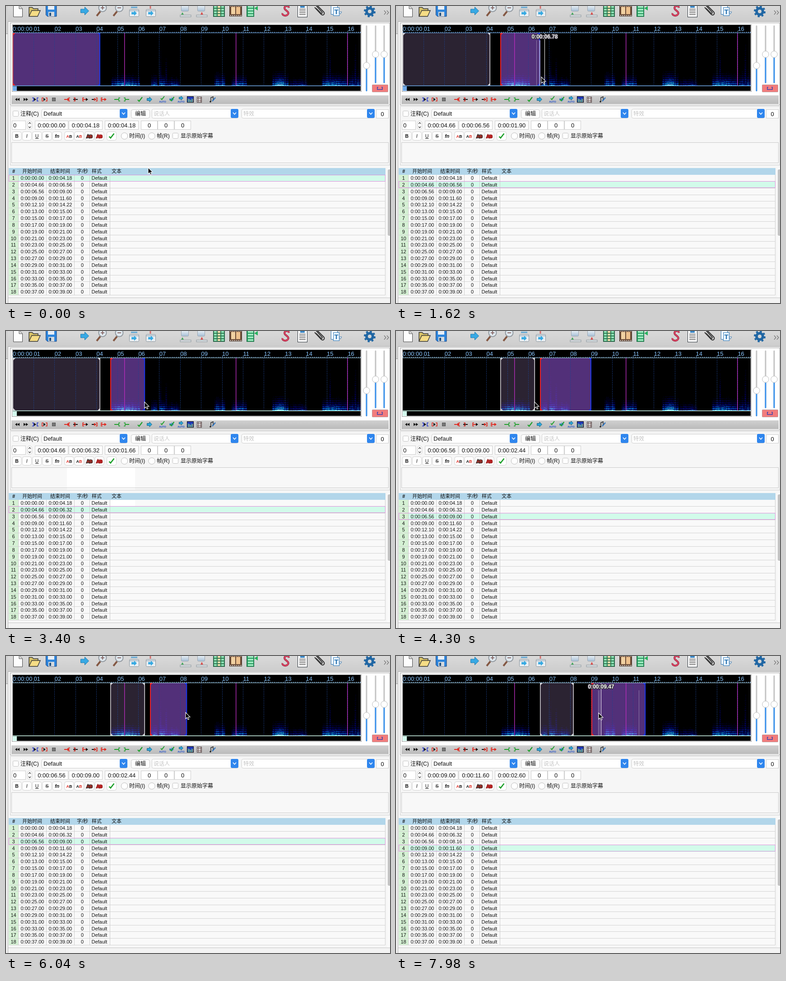
An HTML page with a canvas for the animation above (8000 ms loop, 851 by 658 pixels).

```html
<!DOCTYPE html>
<html lang="zh-CN">
<head>
<meta charset="utf-8">
<title>Subtitle timing</title>
<style>
html, body { margin: 0; width: 100%; height: 100%; overflow: hidden; background: #f6f6f6; }
svg, canvas { position: absolute; left: 0; top: 0; display: block; }
#wave { left: 15px; top: 59px; }
text { font-family: "Liberation Sans", "Noto Sans CJK SC", "Noto Sans CJK", sans-serif; white-space: pre; }
#label { font-weight: bold; font-size: 12px; fill: #fff; stroke: #3a3540; stroke-width: 3px; stroke-linejoin: round; paint-order: stroke; text-anchor: middle; }
</style>
</head>
<body>
<svg id="ui" width="851" height="658"></svg>
<canvas id="wave" width="771" height="119"></canvas>
<svg width="851" height="658">
  <text id="label" y="72"></text>
  <path id="mouse" d="M0 0V14L3.2 11.2L5.4 16L7.7 15L5.6 10.2H9.9Z" fill="#000" stroke="#fff" stroke-width="1.1"/>
</svg>
<script>
const $ = id => document.getElementById(id);
const BLACK = '#111', BLUE = '#2f86ee', RED = '#e02a20', GREEN = '#1fa02c', ROW = 14.84;
let out = [];
const rect = (x, y, w, h, fill, stroke = 'none', rx = 0, more = '') =>
  out.push(`<rect x="${x}" y="${y}" width="${w}" height="${h}" fill="${fill}" stroke="${stroke}" rx="${rx}" ${more}/>`);
const box = (x, y, w, h, fill, stroke, rx) => rect(x + .5, y + .5, w - 1, h - 1, fill, stroke, rx);
const path = (d, fill = 'none', stroke = 'none', w = 1) =>
  out.push(`<path d="${d}" fill="${fill}" stroke="${stroke}" stroke-width="${w}"/>`);
const text = (x, y, s, size = 12, fill = BLACK, more = '') =>
  out.push(`<text x="${x}" y="${y}" font-size="${size}" fill="${fill}" ${more}>${s}</text>`);
const mid = (x, y, s, size, fill, more = '') => text(x, y, s, size, fill, 'text-anchor="middle" ' + more);
const dot = (x, y, r, fill, stroke = 'none', w = 1) =>
  out.push(`<circle cx="${x}" cy="${y}" r="${r}" fill="${fill}" stroke="${stroke}" stroke-width="${w}"/>`);
const check = (x, y, s = 1, c = GREEN) =>
  path(`M${x - 5 * s} ${y + s}L${x - 2 * s} ${y + 4 * s}L${x + 5 * s} ${y - 5 * s}`, 'none', c, 2.4 * s);
const arrow = (x, y, s, c, line = 'none') =>
  path(`M${x - 9 * s} ${y - 4 * s}H${x}V${y - 9 * s}L${x + 9 * s} ${y}L${x} ${y + 9 * s}V${y + 4 * s}H${x - 9 * s}Z`, c, line);
const fmt = s => '0:00:' + s.toFixed(2).padStart(5, '0');
const toX = s => 15 + s * 46.4;

function topBar() {
  rect(0, 0, 851, 34, 'url(#bar)');
  rect(0, 34, 851, 1, '#a9a9a9');
  rect(0, 0, 4, 658, '#efefef'); rect(0, 0, 4, 62, '#d2d2d2');
  rect(0, 61, 4, 1, '#999'); rect(4, 34, 1, 624, '#b4b4b4');
  path('M16.5 -2V24H36.5V6L29 -2Z', '#fdfdfd', '#444'); path('M29 -1V6H36', '#ddd', '#555');
  path('M51 22V3H58L61 6H71V10', '#d9c36a', '#333', 1.4); path('M51 23L57 10H76L70 23Z', '#f5dc85', '#333', 1.4);
  path('M88.5 -2H112V23H92L88.5 20Z', '#2f86dc', '#173f7c'); rect(93, -2, 14, 10, '#e9eff6'); rect(94, 13, 13, 10, '#d5d9dd'); rect(96, 15, 4, 7, '#24527f');
  arrow(174.5, 11, 1, '#38a9e4', '#1c78ad');
  for (const x of [214, 251]) {
    path(`M${x - 5} 12L${x - 13} 22`, 'none', '#845843', 4);
    dot(x, 4, 8.5, '#dfe8ee', '#9299a0', 2);
    path(`M${x - 4} 4H${x + 4}` + (x < 220 ? `M${x} 0V8` : ''), 'none', '#8b6b6b', 2);
  }
  for (const x of [273, 310]) {
    box(x, 7, 22, 17, '#e8edf1', '#8c959c', 2); rect(x + 1, 9, 20, 3, '#bac6d0');
    path(x < 300 ? `M${x + 4} 3H${x + 18}` : `M${x + 10} -1V6`, 'none', x < 300 ? '#62a7d2' : '#d57070', 3);
    arrow(x + 11, 16, .65, '#35a9e2');
  }
  for (const x of [386, 422]) {
    box(x + 2, -3, 17, 15, 'url(#steel)', '#9ba5b0', 2);
    rect(x, 20, 24, 4, '#d9dee1', '#8d979d');
    path(x < 400 ? `M${x + 2} 19H${x + 8}L${x + 5} 14Z` : `M${x + 9} 19H${x + 15}L${x + 12} 13Z`, x < 400 ? '#42a85c' : '#d94a4a');
  }
  box(459, -2, 26, 26, '#2f7b53', '#285740');
  for (let r = 0; r < 4; r++) for (let c = 0; c < 3; c++)
    rect(461 + c * 8, r * 6, 6, 4, c == 1 ? '#f0d9a9' : '#8de0b5');
  box(495, -2, 28, 25, '#6b4a35', '#49382d');
  rect(499, 2, 9, 16, '#f0d0a1'); rect(510, 2, 9, 16, '#eec18d');
  for (let i = 0; i < 6; i++) { rect(497 + i * 4.5, -1, 2, 2, '#eee'); rect(497 + i * 4.5, 20, 2, 2, '#eee'); }
  box(533, -2, 17, 26, '#24975d', '#236d48');
  for (let r = 0; r < 4; r++) rect(536, r * 6, 12, 4, '#9ce7bd');
  path('M558 0V10L550 5Z', '#27b25c');
  const curl = 'M627 4C626 -3 614 0 618 7C621 11 628 13 625 18C621 24 611 21 613 16';
  path(curl, 'none', '#a21b38', 4); path(curl, 'none', '#ee5776', 1.5);
  box(646, -3, 22, 28, '#fff', '#30383f');
  rect(652, 0, 10, 4, '#3d87c4');
  for (let y = 7; y < 22; y += 4) path(`M650 ${y}H664`, 'none', '#555', 1.5);
  path('M684 3L698 18C703 23 708 17 704 13L690 -1M687 -1L700 13C702 16 699 18 697 15L687 5', 'none', '#333', 2);
  box(720, -2, 15, 21, '#fff', '#2e77b6'); box(725, 3, 14, 19, '#eaf5ff', '#2e77b6');
  mid(732, 18, 'T', 15, '#246fae', 'font-weight="bold"'); path('M738 13H744L741 18Z', '#fff', '#3a75a9');
  dot(806, 12, 7, 'none', '#2167a4', 6);
  out.push('<circle cx="806" cy="12" r="11" fill="none" stroke="#2167a4" stroke-width="4" stroke-dasharray="4.3 4.34"/>');
  for (const x of [838, 844]) path(`M${x} 10l4 4.5l-4 4.5`, 'none', '#777', 1.3);
}

function audioPanel() {
  box(9, 37, 842, 183, '#fff', '#a5a5a5');
  box(13, 41, 775, 149, '#fff', '#999');
  rect(15, 42, 771, 146, '#000');
  text(15, 55, '0:00:00', 13, '#88c3fb');
  for (let i = 1; i <= 16; i++) text(toX(i), 55, String(i).padStart(2, '0'), 13, '#88c3fb');
  for (let i = 0; i <= 166; i++) rect(Math.round(toX(i / 10)), i % 10 ? 57 : 55, 1, i % 10 ? 2 : 4, '#80b5e8');
  rect(15, 178, 9, 10, '#70a9e7', 'none', 0, 'id="thumb"');
  for (const [x, end, y] of [[799, 189, 132], [819, 171, 107], [838, 171, 107]]) {
    rect(x - 1.5, 43, 3, end - 43, '#c3c3c3', 'none', 1.5);
    rect(x - 1.5, y, 3, end - y, '#3b94f0', 'none', 1.5);
    dot(x, y, 7.2, '#fff', '#bcbcbc');
  }
  box(811, 174, 36, 17, '#f27c7c', '#b9a0a0', 1);
  path('M825 180H823V185H834V180H832', 'none', '#3d43b0', 1.6);
}

function playBar() {
  rect(12, 198, 836, 18, 'url(#strip)'); rect(12, 216, 836, 1, '#a8a8a8');
  const tri = (x, d = 1, c = BLACK) => path(`M${x} 203.5V210.5L${x + 5 * d} 207Z`, c);
  const open = (x, c) => path(`M${x + 3} 203.5H${x}V210.5H${x + 3}`, 'none', c, 1.5);
  const shut = (x, c) => path(`M${x - 3} 203.5H${x}V210.5H${x - 3}`, 'none', c, 1.5);
  tri(25, -1); tri(30, -1); tri(39); tri(44);
  shut(61, '#2637d0'); tri(62); open(69, '#2637d0');
  open(80, RED); tri(83); shut(91, RED);
  box(102, 203, 8, 8, '#777', '#555');
  for (const [i, x] of [135, 155, 176, 196, 217].entries()) {
    path(`M${x - 6} 207H${x + 4}`, 'none', i % 2 ? BLACK : RED, 2);
    tri(x + (i % 2 ? -1 : 1), i == 1 ? -1 : 1, i < 3 && i ? BLACK : RED);
    if (i < 4) i % 2 ? shut(x + (i == 1 ? -2 : 6), RED) : open(x + (i ? -6 : 4), RED);
    else open(x - 6, RED);
  }
  path('M240 207H250M264 207H273', 'none', GREEN, 2); open(250, GREEN); shut(264, GREEN);
  check(297, 207); arrow(318, 207, .6, '#2ba9dd', '#18607f');
  for (const x of [347, 388]) mid(x, 214, 'AUTO', 5.5, '#1b4ccc', 'font-weight="bold"');
  check(347, 204, .8); arrow(388, 204, .5, '#2ba9dd', '#18607f');
  arrow(367, 207, .55, '#3c8ad4'); check(368, 206, .9);
  box(401, 200, 15, 14, '#2238b8', '#111');
  for (let i = 0; i < 6; i++) rect(403 + i * 2, 205 + (i * 5) % 4, 1, 8 - (i * 5) % 4, i % 2 ? '#e1e84b' : '#51dfaa');
  box(423, 201, 11, 13, '#ddd', '#483838'); path('M426.5 201V214M431.5 201V214M423 205H434M423 210H434', 'none', '#654949', 1);
  path('M454 212V203L459 201V209', 'none', '#222', 1.4); dot(453, 212, 1.8, '#222');
  path('M457 211L464 203', 'none', '#3275bd', 2.5);
}

function form() {
  box(9, 222, 842, 131, '#f6f6f6', '#cfcfcf');
  box(15, 232, 13, 13, '#fff', '#c3c3c3', 2); text(32, 243, '注释(C)');
  for (const [x, w, s] of [[79, 190, 'Default'], [323, 192, '说话人'], [522, 295, '特效']]) {
    const on = s == 'Default';
    box(x, 228, w, 21, '#fff', '#cdcdcd', 3);
    rect(x + w - 17, 228, 17, 20, BLUE, 'none', 3);
    path(`M${x + w - 12} 236l3.5 4l3.5 -4`, 'none', '#fff', 1.6);
    text(x + 4, 243, s, on ? 13 : 12, on ? BLACK : '#c4c4c4');
  }
  box(277, 229, 42, 20, '#fff', '#c9c9c9', 4); mid(298, 243, '编辑');
  const field = (x, y, w, s, id = '') => { box(x, y, w, 20, '#fff', '#cdcdcd'); mid(x + w / 2, y + 15, s, 13, BLACK, id && `id="${id}"`); };
  field(820, 229, 28, '0');
  box(13, 254, 31, 20, '#fff', '#cdcdcd'); text(16, 269, '0', 13);
  box(47, 254, 11, 20, '#fff', '#cdcdcd', 5); path('M50 261l2.5 -3l2.5 3M50 267l2.5 3l2.5 -3', 'none', '#444', 1.2);
  field(64, 254, 74, '', 'from'); field(139, 254, 75, '', 'to'); field(219, 254, 75, '', 'span');
  for (const x of [299, 336, 373]) field(x, 254, 37, '0');
  const style = ['font-weight="bold"', 'font-style="italic"', 'text-decoration="underline"', 'text-decoration="line-through"', 'font-style="italic" font-weight="bold"'];
  ['B', 'I', 'U', 'S', 'fn'].forEach((s, i) => {
    const x = 13.5 + i * 22.3;
    box(x, 278, 21, 20, '#fff', '#d2d2d2', 4); mid(x + 10.5, 292, s, 10.5, BLACK, style[i]);
  });
  [140, 162, 185, 207].forEach((x, i) => {
    box(x - 10.5, 278, 21, 20, '#fff', '#d2d2d2', 4);
    const a = i == 1 ? BLACK : RED, b = i ? RED : BLACK;
    if (i > 1) mid(x, 292, 'AB', 9, BLACK, `font-weight="bold" stroke="${i == 2 ? '#111' : '#811'}" stroke-width="2.4"`);
    mid(x, 292, i > 1 ? 'AB' : `<tspan fill="${a}">A</tspan><tspan fill="${b}">B</tspan>`, 9, i == 2 ? '#f54a3e' : '#d33', 'font-weight="bold"');
  });
  box(223, 278, 22, 20, '#fff', '#d2d2d2', 4); check(234, 288, 1.1);
  dot(262.5, 288, 7.2, '#fff', '#bbb'); text(273, 292, '时间(I)');
  dot(323, 288, 7.2, '#fff', '#bbb'); text(334, 292, '帧(R)');
  box(369, 281, 13, 13, '#fff', '#c3c3c3', 2); text(387, 292, '显示原始字幕');
  box(12, 302, 836, 46, '#f8f8f8', '#c9c9c9');
}

const lines = [[0, 4.18], [4.66, 6.56], [6.56, 9], [9, 11.6], [12.1, 14.22]];
for (let s = 13; s < 39; s += 2) lines.push([s, s + 2]);

function table() {
  rect(5, 358, 837, 284, '#f9f9f9');
  rect(6, 359, 835, 15, '#b2d6ea');
  rect(6, 374, 21, 267, '#d5f1d4');
  rect(28, 374, 813, 15, '#d2fbea', 'none', 0, 'id="fill"');
  for (let i = 1; i <= 18; i++) rect(6, Math.round(374 + i * ROW) - 1, 835, 1, '#d3d3d3');
  for (const x of [27, 89, 151, 185, 230, 840]) rect(x, 374, 1, 267, '#cdcdcd');
  rect(6.5, 374.5, 834, 14, 'none', '#dd8fdc', 0, 'id="pick"');
  mid(17, 370, '#', 11, BLACK, 'font-weight="bold"');
  [[36, '开始时间'], [98, '结束时间'], [157, '字/秒'], [190, '样式'], [234, '文本']].forEach(([x, s]) => text(x, 370, s, 11));
  lines.forEach(([a, b], i) => {
    const y = (385 + i * ROW).toFixed(1);
    mid(16.5, y, i + 1, 11); text(32.5, y, fmt(a), 11); text(94.5, y, fmt(b), 11, BLACK, `id="end${i}"`);
    mid(169, y, '0', 11); text(189.5, y, 'Default', 11);
  });
  rect(845, 358, 6, 288, '#fafafa'); rect(846, 362, 9, 147, '#c4c4c4', 'none', 3);
  rect(5, 646, 846, 1, '#c6c6c6'); rect(5, 647, 846, 11, '#f3f3f3');
  out.push('<g id="flash">');
  rect(135, 303, 151, 44, '#fff'); rect(135, 348, 151, 4, '#fcfcfc'); rect(231, 375, 55, 13, '#fff');
  out.push('</g>');
}

const grad = (id, a, b) => `<linearGradient id="${id}" x2="0" y2="1"><stop stop-color="${a}"/><stop offset="1" stop-color="${b}"/></linearGradient>`;
out.push('<defs>' + grad('bar', '#d9d9d9', '#cdcdcd') + grad('strip', '#d0d0d0', '#bcbcbc') + grad('steel', '#f2f6f9', '#a6bfd6') + '</defs>');
topBar(); audioPanel(); playBar(); form(); table();
$('ui').innerHTML = out.join('');

let seed = 7;
const rnd = () => (seed = seed * 16807 % 2147483647) / 2147483647;
const spec = document.createElement('canvas');
spec.width = 771; spec.height = 119;
const sg = spec.getContext('2d');
sg.fillRect(0, 0, 771, 119);
sg.globalCompositeOperation = 'lighten';
const hue = v => `rgb(${[(v - .75) * 300, (v - .25) * 330, v < .5 ? v * 380 : 120 + v * 130].map(c => Math.max(0, Math.min(255, c | 0)))})`;

// One sound: left, width, strength, decay height
function burst(a, w, amp, h) {
  for (let x = a; x < a + w; x += 2) {
    const env = amp * (.55 + .45 * Math.sin(Math.PI * (x - a + 1) / (w + 1))) * (.6 + .5 * rnd());
    for (let y = 0; y < Math.min(90, h * 3); y++) {
      const v = env * Math.exp(-y / h) * (.65 + .45 * Math.cos(y * 1.5 + Math.sin(x / 9))) * (.6 + .6 * rnd());
      if (v < .06) continue;
      sg.fillStyle = hue(v);
      sg.fillRect(x - 15, 116 - y, 2, 1);
    }
  }
}
burst(233, 64, 1.25, 9); burst(590, 35, 1.35, 11); burst(700, 57, 1.3, 10);
for (const x of [322, 339]) burst(x, 14, 1, 10);
for (const x of [462, 474]) burst(x, 11, 1.1, 11);
for (const x of [760, 775]) burst(x, 12, .8, 12);
burst(357, 27, .75, 8); burst(500, 33, 1, 10); burst(628, 40, .6, 8);
for (const x of [340, 353, 716, 772]) burst(x, 4, .42, x < 700 ? 35 : 46);

// Pointer runs: start, end, steps, x from, x to, lead of the hover line (0 = hidden)
const runs = [
  [0, 360, 2, 315, 314, 0], [540, 630, 2, 314, 312, 0],
  [780, 1230, 6, 311, 315, 1], [1320, 1500, 3, 317, 325, 1], [1620, 1620, 1, 322, 322, 7.5], [1710, 1830, 2, 320, 319, 1],
  [2190, 2390, 1, 319, 319, 0], [2690, 2950, 4, 317, 307, 0], [4480, 4480, 1, 335, 335, 0],
  [4630, 4980, 5, 340, 441, 1], [5160, 5450, 4, 439, 433, 1],
  [5720, 6040, 5, 432, 398, 0], [6150, 6380, 3, 395, 392, 0], [7100, 7210, 1, 413, 413, 0],
  [7360, 7660, 4, 415, 537, 1], [7770, 7980, 3, 525, 449, 5.5]];

function pointer(t) {
  const [t0, t1, n, a, b, lead] = runs.filter(r => r[0] <= t).pop();
  const p = n > 1 ? Math.min(1, Math.floor((t - t0) / (t1 - t0) * (n - 1) + .001) / (n - 1)) : 0;
  const q = t0 + p * (t1 - t0), x = a + (b - a) * p;
  const left = (from, len) => Math.min(1, Math.max(0, 1 - (q - from) / len));
  const y = q < 360 ? 358 : q < 540 ? 357 : q < 630 ? 290 : q < 780 ? 181
    : q < 4480 ? 157 + 17 * left(780, 500) ** 2
    : q < 4630 ? 158 : 125 + 27 * left(4630, 350) ** 1.3 + (q >= 7100);
  return { x, y, hover: lead && x + lead };
}

// from, until, x, width: marks left behind by the hover line
const trails = [[1050, 2190, 311, 1], [1410, 2190, 317, 3], [7560, 8000, 448, 1], [7560, 8000, 450, 1], [7770, 8000, 538, 1]];

const g = $('wave').getContext('2d');
g.translate(-15, -59);
const bar = (x, y, w, h, c) => { g.fillStyle = c; g.fillRect(x, y, w, h); };

function corner(x, y, dx, dy, c) {
  g.fillStyle = c; g.beginPath();
  g.moveTo(x, y); g.lineTo(x + dx, y); g.lineTo(x, y + dy); g.fill();
}
function region([from, to], c1, c2, w) {
  const a = Math.max(15, Math.round(toX(from))), b = Math.round(toX(to));
  bar(a, 60, a > 15 ? w : 1, 116, c1); bar(b - w, 60, w, 116, c2);
  for (const [y, d] of [[60, 6], [176, -6]]) { corner(a, y, 6, d, c1); corner(b, y, -6, d, c2); }
}

function draw() {
  const t = performance.now() % 8000;
  const row = t < 540 ? 0 : t < 4300 ? 1 : t < 7100 ? 2 : 3;
  const { x: mx, y: my, hover } = pointer(t);
  const live = lines.map(l => l.slice());
  const dragged = lead => (mx + lead - 15) / 46.4;
  if (t >= 2690) live[1][1] = t < 2950 ? dragged(1.2) : 6.32;
  if (t >= 5720) live[2][1] = t < 6380 ? Math.min(9, dragged(t < 6150 ? 3.4 : 1.6)) : 8.16;
  const rim = t < 2190 ? '#70a9e7' : '#d3fbed';

  g.globalCompositeOperation = 'source-over';
  g.drawImage(spec, 15, 59);
  g.globalCompositeOperation = 'screen';
  const tint = ([a, b], c) => bar(toX(a), 60, toX(b) - toX(a), 116, c);
  if (row) tint(live[row - 1], '#2b2332');
  tint(live[row], '#523079');
  g.globalCompositeOperation = 'source-over';
  for (let i = 1; i <= 16; i++)
    for (let y = 61; y < 176; y += 4) bar(Math.floor(toX(i)), y, 1, 2, '#1c438f');
  for (const x of [262, 509, 756]) bar(x, 60, 1.4, 116, '#b32bb8');
  bar(15, 59, 771, 1, t < 2190 ? '#70a9e7' : '#a5d2e8');
  bar(15, 176, 771, 1.5, rim);
  if (row) region(live[row - 1], '#d0cdd2', '#d0cdd2', 1.6);
  region(live[row], '#ee2020', '#1734e6', 2);
  for (const [a, b, x, w] of trails) if (t >= a && t < b) bar(x, 76, w, 100, w > 1 ? '#8a86c8' : '#8d7ca6');
  if (hover) bar(Math.floor(hover), 60, 1, 116, '#fff');

  $('label').textContent = hover ? fmt((hover - 15) / 46.4) : '';
  $('label').setAttribute('x', hover);
  $('mouse').setAttribute('transform', `translate(${mx} ${my})`);
  $('thumb').setAttribute('fill', rim);

  // Text fields follow only once a drag has been committed
  const ends = [4.18, t < 3400 ? 6.56 : 6.32, t < 6740 ? 9 : 8.16, 11.6];
  const [from] = lines[row];
  $('from').textContent = fmt(from);
  $('to').textContent = fmt(ends[row]);
  $('span').textContent = fmt(ends[row] - from);
  $('end1').textContent = fmt(ends[1]);
  $('end2').textContent = fmt(ends[2]);
  const y = Math.round(374 + row * ROW);
  $('fill').setAttribute('y', y);
  $('pick').setAttribute('y', y + .5 - (row ? 1 : 0));
  $('flash').style.display = t >= 3400 && t < 4300 || t >= 6740 && t < 7100 ? '' : 'none';
  requestAnimationFrame(draw);
}
draw();
</script>
</body>
</html>
```
